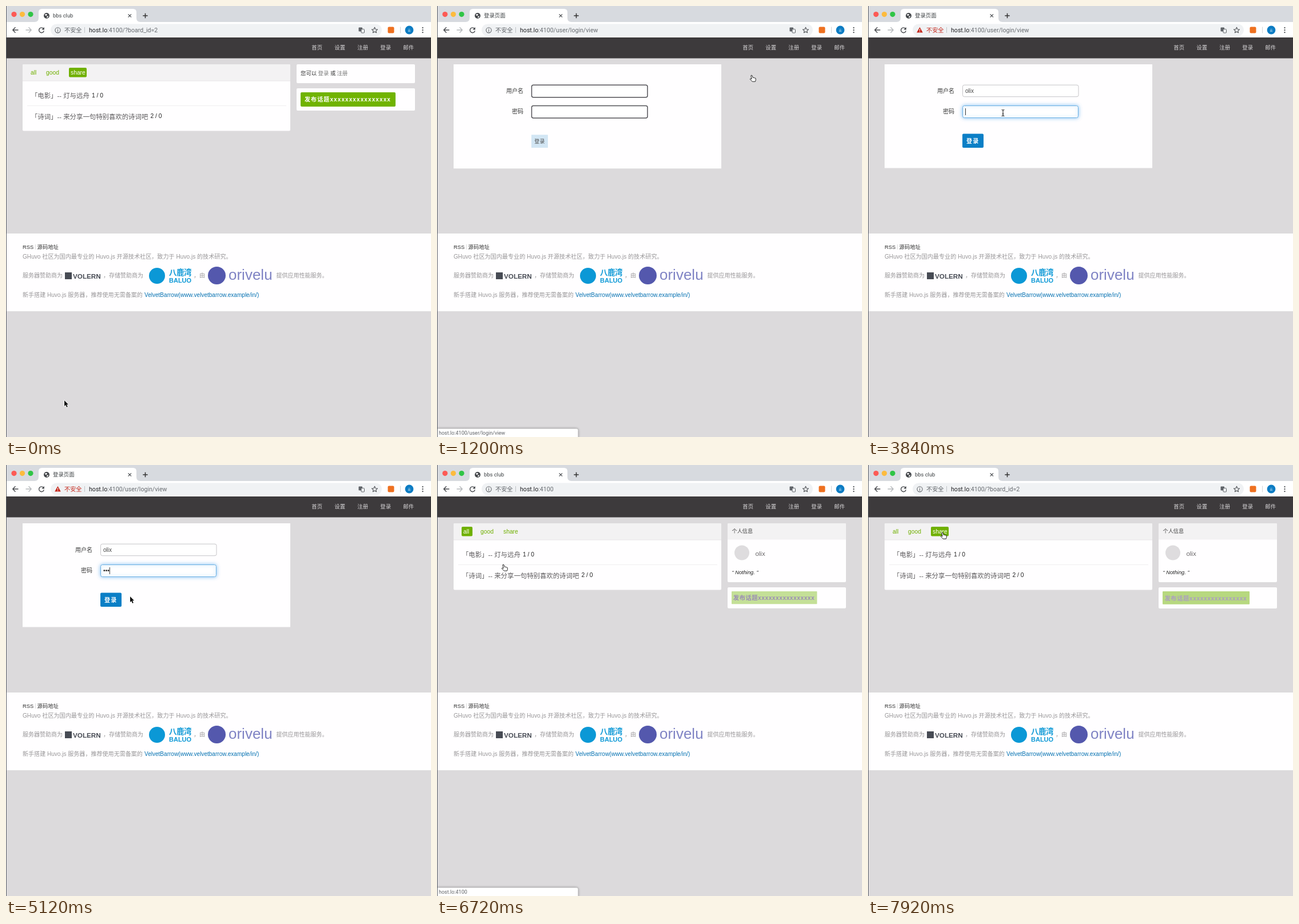
Write an HTML page with a canvas that moves like this. It is 743 px wide and 754 px high and loops after 8000 ms.

```html
<!DOCTYPE html>
<html lang="zh-CN">
<head>
<meta charset="utf-8">
<title>bbs club</title>
<style>
html, body { margin: 0; width: 100%; height: 100%; overflow: hidden; background: #dcdadc; }
canvas { display: block; }
</style>
</head>
<body>
<canvas id="stage" width="743" height="754"></canvas>
<script>
const ctx = document.getElementById('stage').getContext('2d');
const LOOP = 8000, STEP = 80;
const PAGE = '"Liberation Sans", "Noto Sans CJK SC", "Noto Sans CJK", sans-serif';
const UI = 'Roboto, "Noto Sans CJK SC", "Noto Sans CJK", sans-serif';
const HOST = 'host.lo', PORT = ':4100', USER = 'olix';
const ACCOUNTS = ['pob', 'mirda', 'pobpob', 'pob_1', 'Orvo', USER];

// Moments of the story, in ms
const LOGIN_LOAD = 1140, FOCUS = 1840, PICK = 3200, PASSWORD = 3760,
      SUBMIT = 5480, HOME_LOAD = 6620, SHARE_LOAD = 7802;

// Pointer stops: time, x, y
const STOPS = [
  [80, 102, 690], [800, 550, 121], [1240, 550, 121], [1740, 247, 151],
  [2680, 247, 151], [3040, 206, 308], [3240, 206, 308], [3680, 236, 187],
  [4480, 236, 187], [5000, 217, 230], [5160, 217, 230], [5380, 188, 236],
  [5520, 188, 236], [6080, 128, 180], [6180, 128, 180], [6340, 116, 174],
  [6800, 116, 174], [7520, 130, 118]
];

const clamp = v => Math.max(0, Math.min(1, v));
const smooth = v => v * v * (3 - 2 * v);
const mix = (a, b, p) => a + (b - a) * p;
const mixRgb = (a, b, p) => `rgb(${a.map((v, i) => Math.round(mix(v, b[i], p)))})`;

// The "ease" curve of a 400 ms style transition
function transition(elapsed) {
  const x = clamp(elapsed / 400);
  let lo = 0, hi = 1;
  for (let i = 0; i < 18; i++) {
    const s = (lo + hi) / 2;
    const bx = 3 * s * (1 - s) ** 2 * .25 + 3 * s * s * (1 - s) * .25 + s ** 3;
    if (bx < x) lo = s; else hi = s;
  }
  return 3 * lo * (1 - lo) ** 2 * .1 + 3 * lo * lo * (1 - lo) + lo ** 3;
}

function rect(x, y, w, h, fill, r = 0, stroke, line = 1) {
  ctx.beginPath();
  ctx.roundRect(x, y, w, h, r);
  if (fill) { ctx.fillStyle = fill; ctx.fill(); }
  if (stroke) { ctx.strokeStyle = stroke; ctx.lineWidth = line; ctx.stroke(); }
}

function circle(x, y, r, fill, stroke, line = 1.2) {
  ctx.beginPath();
  ctx.arc(x, y, r, 0, Math.PI * 2);
  if (fill) { ctx.fillStyle = fill; ctx.fill(); }
  if (stroke) { ctx.strokeStyle = stroke; ctx.lineWidth = line; ctx.stroke(); }
}

function path(d, x, y, stroke, line = 1.4, fill) {
  ctx.save();
  ctx.translate(x, y);
  const p = new Path2D(d);
  if (fill) { ctx.fillStyle = fill; ctx.fill(p); }
  if (stroke) {
    ctx.strokeStyle = stroke;
    ctx.lineWidth = line;
    ctx.lineJoin = 'round';
    ctx.stroke(p);
  }
  ctx.restore();
}

function text(str, x, y, size, color, style = '', family = PAGE, spacing = 0) {
  ctx.font = `${style} ${size}px ${family}`;
  ctx.letterSpacing = spacing + 'px';
  ctx.fillStyle = color;
  ctx.fillText(str, x, y);
}

function glow(color, blur, dy, draw) {
  ctx.save();
  ctx.shadowColor = color;
  ctx.shadowBlur = blur;
  ctx.shadowOffsetY = dy;
  draw();
  ctx.restore();
}

function browser(title, route, warned) {
  const dark = '#45484c';
  rect(0, 0, 743, 28, '#d7dadf');
  [['#fc5a55', 14], ['#fdbb3e', 28.5], ['#30c546', 43]].forEach(([c, x]) => circle(x, 14.6, 4.6, c));
  path('M50 28 Q57 28 57 21 V11 Q57 5 63 5 H222 Q228 5 228 11 V21 Q228 28 235 28 Z', 0, 0, null, 0, '#fff');
  circle(71, 17, 5, dark);
  path('M-3.4 -1.5 L-1 -3.3 L1.2 -2 L-.8 .2 Z M.3 1.2 L3.3 .2 L2 3.2 L.4 3.4 Z', 71, 17, null, 0, '#fff');
  text(title, 82, 20.2, 9.4, '#3c4043', '', UI);
  path('M-2.7 -2.7 L2.7 2.7 M2.7 -2.7 L-2.7 2.7', 216.3, 17, dark, 1.2);
  path('M-4.2 0 H4.2 M0 -4.2 V4.2', 243.5, 17, '#333', 1.5);

  rect(0, 28, 743, 27, '#fff');
  path('M5 0 H-4.5 M0 -4.7 L-4.7 0 L0 4.7', 16.5, 42, dark);
  path('M-5 0 H4.5 M0 -4.7 L4.7 0 L0 4.7', 39.5, 42, '#b5b8bb');
  path('M3.5 -2.6 A4.4 4.4 0 1 0 4.3 1.2', 62, 42.2, dark);
  path('M4.9 -5 V-.4 H.3 Z', 62, 42, null, 0, dark);
  rect(78, 31.5, 579, 21, '#f0f2f4', 10.5);
  if (warned) {
    path('M0 -5 L5.3 4.6 H-5.3 Z', 90.5, 42, null, 0, '#c5281c');
    path('M0 -1.8 V1.3 M0 2.3 V3.4', 90.5, 42, '#fff', 1.1);
  } else {
    circle(90.5, 42.3, 4.6, null, '#5f6368', 1.1);
    path('M0 -2.6 V-1.4 M0 -.5 V2.6', 90.5, 42.3, '#5f6368', 1.1);
  }
  text('不安全', 102, 45.8, 10.2, warned ? '#c5281c' : '#5f6368', '', UI);
  rect(137, 37, 1, 10, '#bfc2c6');
  text(HOST, 145, 45.8, 10.6, '#202124', '', UI);
  const hostWidth = ctx.measureText(HOST).width;
  text(PORT + route, 145 + hostWidth, 45.8, 10.6, '#686c71', '', UI);

  rect(616.5, 37.5, 6.5, 7, '#5f6368', 1);
  rect(621, 40.5, 5.5, 6.5, '#f0f2f4', 1, '#5f6368');
  path('M0 -5 L1.5 -1.6 L5 -1.3 L2.3 1 L3.1 4.4 L0 2.6 L-3.1 4.4 L-2.3 1 L-5 -1.3 L-1.5 -1.6 Z', 644.5, 42.3, '#505357', 1.1);
  rect(667.5, 36.5, 11, 11, '#ee701f', 2);
  rect(689, 36.5, 1, 11, '#cfd2d6');
  circle(705, 42, 7.4, '#0c7cc3');
  text('云', 702.5, 44, 5, '#fff', '', UI);
  [-4, 0, 4].forEach(d => circle(728.5, 42.2 + d, 1.15, dark));

  rect(0, 55, 743, 36.5, '#3d3a3c');
  ['首页', '设置', '注册', '登录', '邮件'].forEach((s, i) => text(s, 534.3 + i * 40, 76.4, 9.4, '#d8d6d8'));
}

function footer() {
  const gray = '#989698';
  rect(0, 398, 743, 136, '#fffeff');
  text('RSS', 29, 424.8, 9.3, '#333');
  rect(51, 417, .8, 9, '#d5d5d5');
  text('源码地址', 54.6, 424.8, 9.3, '#333');
  text('GHuvo 社区为国内最专业的 Huvo.js 开源技术社区，致力于 Huvo.js 的技术研究。', 29, 442, 10.12, gray);
  text('服务器赞助商为', 29, 475, 10, gray);
  rect(103, 466, 12, 12, '#474b54');
  text('VOLERN', 117, 477, 11.7, '#474b54', 'bold');
  text('，存储赞助商为', 170, 475, 10, gray);
  circle(264, 472, 14, '#0b98d6');
  text('八鹿湾', 285, 471, 13.2, '#0b98d6', 'bold');
  text('BALUO', 285, 484, 11, '#0b98d6', 'bold');
  text('，由', 328, 475, 10, gray);
  circle(368.5, 471.5, 15.5, '#5458ad');
  text('orivelu', 389, 479, 26, '#7f83c4');
  text('提供应用性能服务。', 472.5, 475, 10, gray);
  text('新手搭建 Huvo.js 服务器，推荐使用无需备案的', 29, 509, 10.05, gray);
  text('VelvetBarrow(www.velvetbarrow.example/in/)', 242, 509, 10.05, '#0672b2');
}

function tabs(active) {
  const starts = active === 'all' ? [46, 76, 116] : [43, 70, 113];
  ['all', 'good', 'share'].forEach((name, i) => {
    const x = starts[i];
    const on = name === active;
    if (on) rect(x - 3, 108, name === 'all' ? 19 : 31, 16.5, '#70b000', 2);
    text(name, x, 120.3, 10.3, on ? '#fff' : '#70b000');
  });
}

function postButton(y, p) {
  rect(508, y, 207, mix(35, 39, p), '#fffeff', 2);
  ctx.globalAlpha = p;
  rect(515, y + 7, mix(138, 166, p), mix(20.5, 25, p), '#70b300', 2 * p);
  ctx.globalAlpha = 1;
  text('发布话题' + 'x'.repeat(16), 515 + 7 * p, y + mix(21.8, 23.3, p), mix(10.6, 10, p),
    mixRgb([85, 60, 130], [255, 255, 255], p), 'bold', PAGE, 1.1 * p);
}

function board(active, loggedIn, p) {
  rect(29, 102, 468, 116.5, '#fffeff', 2);
  rect(29, 102, 468, 29, '#f3f2f3', [2, 2, 0, 0]);
  rect(29, 130.5, 468, 1, '#e8e6e8');
  tabs(active);
  text('「电影」-- 灯与远舟', 43.9, 160.6, 11.4, '#5c5a5c');
  text('1 / 0', 150, 159.5, 10.3, '#222');
  rect(37, 174, 453, 1, '#f0eef0');
  text('「诗词」-- 来分享一句特别喜欢的诗词吧', 43.9, 197.5, 11.4, '#5c5a5c');
  text('2 / 0', 252.5, 196, 10.3, '#222');

  if (!loggedIn) {
    rect(508, 102, 207, 33, '#fffeff', 2);
    text('您可以', 515, 121.4, 9.4, '#333');
    text('登录', 545.5, 121.4, 9.4, '#777');
    text('或', 567, 121.4, 9.4, '#333');
    text('注册', 578.5, 121.4, 9.4, '#777');
    postButton(144, p);
    return;
  }
  rect(508, 102, 207, 103, '#fffeff', 2);
  rect(508, 102, 207, 28.5, '#f3f2f3', [2, 2, 0, 0]);
  text('个人信息', 515.5, 119.3, 9.2, '#444');
  circle(533, 153.5, 13, '#dedcde');
  text(USER, 556.5, 158.6, 11.4, '#6a686a');
  text('“ Nothing. ”', 515.5, 191.4, 9.3, '#222', 'italic');
  postButton(214, p);
}

function input(y, focused, p) {
  if (focused) {
    glow('rgba(82,168,236,.7)', 6, 0, () => rect(165.5, y + .5, 202, 21, '#fff', 3, '#6db1e3'));
    return;
  }
  const border = mixRgb([55, 55, 60], [198, 197, 200], p);
  rect(165.5, y + .5, 202.5, mix(21.7, 20.5, p), '#fff', 3, border, mix(1.6, 1, p));
}

function caret(x, y) {
  rect(x, y, 1, 12, '#333');
}

function loginPage(t, p) {
  const done = t >= SUBMIT;
  const dy = done ? 80 : 0;
  rect(29, 102, 468, mix(182.5, 181.5, p) + dy, '#fffeff');
  if (done) {
    [109.5, 156.5].forEach(y => rect(36.5, y, 453.5, 32.5, '#fbf7df', 1, '#f1ebcb'));
    text('成功', 47, 129.5, 10, '#b57d35', 'bold');
    text('点此跳转到论坛首页', 47, 176.5, 10, '#777');
  }
  const userFocus = t >= FOCUS && t < PASSWORD;
  const passFocus = t >= PASSWORD && !done;
  text('用户名', 121, 152.2 + dy, 10, '#333');
  text('密码', 131, 188.3 + dy, 10, '#333');
  input(137.7 + dy, userFocus, p);
  input(174 + dy, passFocus, p);

  // Button grows from its unstyled look
  ctx.globalAlpha = p;
  rect(165, mix(225.5, 223.5, p) + dy, mix(27, 37, p), mix(22.5, 24.5, p), '#0a7fc6', 2 * p);
  ctx.globalAlpha = 1;
  text('登录', mix(170, 172, p), 239.8 + dy, mix(8.6, 10, p),
    mixRgb([30, 30, 30], [255, 255, 255], p), p > .5 ? 'bold' : '', PAGE, 1.2 * p);

  if (t >= PICK && !done) text(USER, 170, 152.2, 10, '#444');
  if (userFocus && t < PICK) {
    caret(170, 142.5);
    glow('rgba(0,0,0,.4)', 4, 1, () => rect(165, 161, 203, 165, '#fff', 3));
    ACCOUNTS.forEach((name, i) => {
      const y = 180 + i * 25.65;
      if (i === 5 && t >= 3000) rect(165, y - 12.5, 203, 25, '#eeeeef');
      text(name, 173.7, y + 3.3, 9.6, '#2d2d2f', 'bold', UI);
    });
  } else if (userFocus) {
    caret(188, 142.5);
  }
  if (passFocus) {
    const typed = Math.floor(3 * clamp((t - PASSWORD) / 700));
    for (let i = 0; i < typed; i++) circle(171.8 + i * 3.6, 184.7, 1.4, '#222');
    caret(170 + typed * 3.6, 179);
  }
}

function statusBar(route) {
  glow('rgba(0,0,0,.45)', 4, 0, () => rect(-2, 739.5, 248.5, 18, '#fff', 3));
  text(HOST + PORT + route, 3, 749.7, 9, '#606367', '', UI);
}

function pointer(t) {
  let [, x, y] = STOPS[0];
  for (let i = 1; i < STOPS.length; i++) {
    const [t0, x0, y0] = STOPS[i - 1], [t1, x1, y1] = STOPS[i];
    if (t < t0) break;
    const p = smooth(clamp((t - t0) / (t1 - t0)));
    x = mix(x0, x1, p);
    y = mix(y0, y1, p);
  }
  const within = (a, b) => t >= a && t < b;
  if (within(740, 1280) || within(6300, 6860) || t >= 7440) {
    path('M-1.2 .8 Q0 -.7 1 .8 L2.2 4.4 Q3.2 3.6 3.9 4.7 Q4.9 4 5.6 5 Q6.8 4.5 7.1 6 L7.3 8.6 L6.4 11.2 H1.3 L-2.7 7.2 Q-2.8 5.8 -1.2 6.2 L.2 6.9 Z',
      x, y, '#222', 1, '#fff');
  } else if (within(1680, 2760) || within(3600, 4560)) {
    path('M-2.4 -5.5 Q0 -5.5 0 -4 Q0 -5.5 2.4 -5.5 M0 -4 V4 M-2.4 5.5 Q0 5.5 0 4 Q0 5.5 2.4 5.5 M-1.3 1.8 H1.3', x, y, '#222', 1.1);
  } else {
    const arrow = 'M0 0 V10 L2.3 7.9 L4 11.9 L5.8 11.1 L4.1 7.3 H7.1 Z';
    path(arrow, x, y, '#fff', 1.6);
    path(arrow, x, y, null, 0, '#111');
  }
}

function render(t) {
  rect(0, 0, 743, 754, '#dcdadc');
  const onLogin = t >= LOGIN_LOAD && t < HOME_LOAD;
  const onShare = t < LOGIN_LOAD || t >= SHARE_LOAD;
  const route = onLogin ? '/user/login/view' : onShare ? '/?board_id=2' : '';
  browser(onLogin ? '登录页面' : 'bbs club', route, t >= PICK && t < SUBMIT);
  footer();

  const loads = [-LOOP, LOGIN_LOAD, SUBMIT, HOME_LOAD, SHARE_LOAD];
  const p = transition(t - Math.max(...loads.filter(v => v <= t)));
  if (onLogin) loginPage(t, p);
  else board(onShare ? 'share' : 'all', t >= HOME_LOAD, p);

  if (t >= 800 && t < 1440) statusBar('/user/login/view');
  if (t >= 6380 && t < 7280) statusBar('');
  rect(0, 0, 1, 754, '#5c6068');
  pointer(t);
}

function frame() {
  render(Math.floor(performance.now() % LOOP / STEP) * STEP);
  requestAnimationFrame(frame);
}
frame();
</script>
</body>
</html>
```
